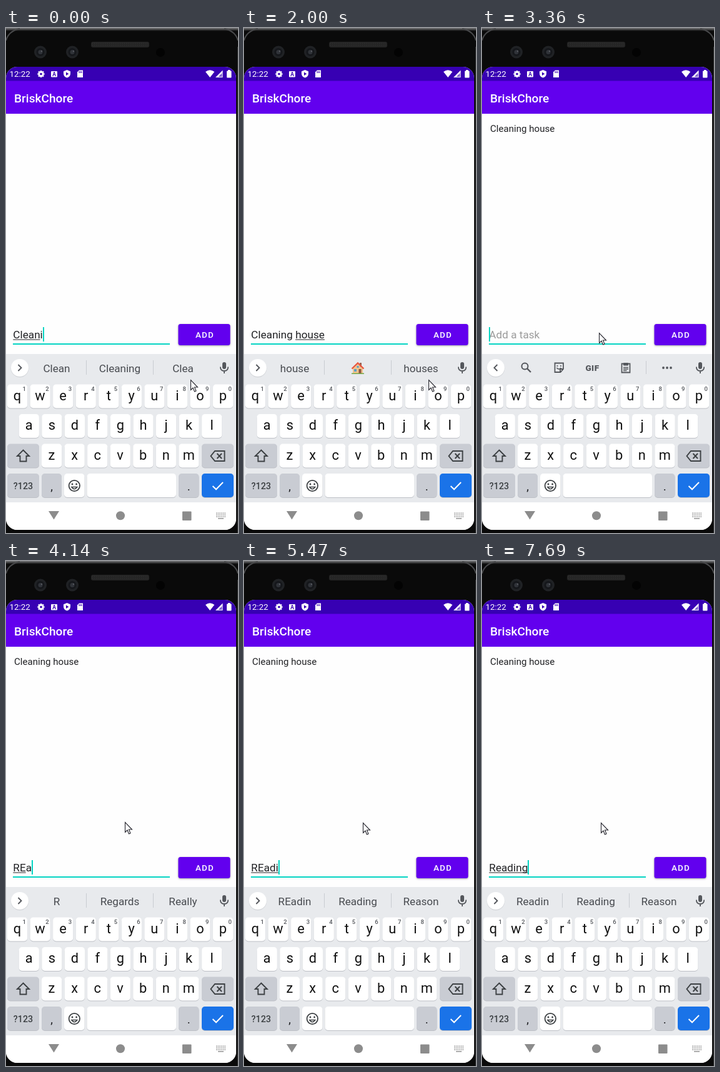
These frames come from a looping animation (371x807 px, 7990 ms). An HTML page with a canvas:

```html
<!DOCTYPE html>
<html lang="en">
<head>
<meta charset="utf-8">
<title>To-do list</title>
<style>
html, body { margin: 0; width: 100%; height: 100%; overflow: hidden; background: #0a0a0a; }
canvas { display: block; width: 371px; height: 807px; }
</style>
</head>
<body>
<canvas id="stage"></canvas>
<script>
const W = 371, H = 807, LOOP = 7990;
const canvas = document.getElementById('stage');
const ratio = window.devicePixelRatio || 1;
canvas.width = W * ratio;
canvas.height = H * ratio;
const c = canvas.getContext('2d');

const PURPLE = '#6200ee', TEAL = '#03d4c3', INK = '#202124', GREY = '#54575c';

// Each step overrides only what changes. "mark" is the underlined range.
const STEPS = [
  [0, { text: 'Cleani', mark: [0, 5], hints: 'Clean|Cleaning|Clea', caret: true, mouse: [295, 562], item: false, press: 0 }],
  [150, { text: 'Cleanin', mark: [0, 6], hints: 'Cleani|Cleaning|Cleaning’s' }],
  [310, { text: 'Cleaning', mark: [0, 7], hints: 'Cleanin|Cleaning|Cleans' }],
  [470, { text: 'Cleaning ', mark: [0, 0], hints: 'the|up|and' }],
  [630, { text: 'Cleaning h', hints: 'the|up|and' }],
  [800, { text: 'Cleaning ho', mark: [9, 10], hints: 'h|house|his' }],
  [970, { text: 'Cleaning hou', mark: [9, 11], hints: 'ho|house|home' }],
  [1140, { text: 'Cleaning hous', mark: [9, 12], hints: 'hou|house|houses' }],
  [1290, { text: 'Cleaning house', mark: [9, 13], hints: 'hous|house|houses' }],
  [1600, { mark: [9, 14], hints: 'house|*|houses' }],
  [2000, { caret: false }],
  [2280, { mouse: [298, 571] }],
  [2410, { mouse: [309, 520] }],
  [2540, { mouse: [314, 445], caret: true }],
  [2670, { mouse: [313, 470] }],
  [2800, { mouse: [311, 487] }],
  [3090, { press: 0.2, text: '', mark: [0, 0], hints: '', item: true }],
  [3240, { press: 0.1, mouse: [268, 490] }],
  [3360, { press: 0, mouse: [187, 487] }],
  [3480, { mouse: [188, 452] }],
  [3610, { mouse: [190, 417] }],
  [3740, { text: 'R' }],
  [3870, { mark: [0, 1], hints: 'R|Re|Regards' }],
  [3990, { text: 'RE', hints: 'R|Regards|Really' }],
  [4140, { text: 'REa', mark: [0, 2] }],
  [4270, { mark: [0, 3], hints: 'REa|Really|Read', mouse: [190, 418] }],
  [4400, { text: 'REad' }],
  [4530, { mark: [0, 4], hints: 'REad|Read|Ready' }],
  [4660, { text: 'REadi' }],
  [4790, { text: 'REadin', mark: [0, 5], hints: 'REadi|Reading|Reason' }],
  [4920, { text: 'REading', mark: [0, 7], hints: 'REadin|Reading|Reason' }],
  [5200, { text: 'REadin', mark: [0, 0], hints: 'REading|Reading|Readings' }],
  [5350, { mark: [0, 6], hints: 'REadin|Reading|Reason' }],
  [5470, { text: 'REadi', mark: [0, 5] }],
  [5620, { text: 'REad', mark: [0, 4], hints: 'REadi|Reading|Reason' }],
  [5770, { text: 'REa', mark: [0, 3], hints: 'REad|Read|Ready' }],
  [6080, { text: 'RE', mark: [0, 2], hints: 'REa|Really|Read' }],
  [6230, { text: 'R', mark: [0, 1], hints: 'RE|Regards|Really' }],
  [6360, { hints: 'R|Re|Regards' }],
  [6480, { text: 'Re' }],
  [6600, { text: 'Rea', mark: [0, 2], hints: 'Re|Regards|Resume' }],
  [6750, { mark: [0, 3], hints: 'Rea|Really|Read' }],
  [7000, { hints: 'Rea|Ready|Read' }],
  [7150, { text: 'Read' }],
  [7300, { mark: [0, 4], hints: 'Read|Ready|Reading' }],
  [7430, { text: 'Readi' }],
  [7560, { text: 'Readin', mark: [0, 6], hints: 'Readi|Reading|Reason' }],
  [7690, { text: 'Reading', mark: [0, 7], hints: 'Readin|Reading|Reason' }]
];

const stateAt = t => Object.assign({}, ...STEPS.filter(s => s[0] <= t).map(s => s[1]));

function rect(x, y, w, h, color, r = 0) {
  c.fillStyle = color;
  c.beginPath();
  c.roundRect(x, y, w, h, r);
  c.fill();
}

function disc(x, y, r, color) {
  c.fillStyle = color;
  c.beginPath();
  c.arc(x, y, r, 0, Math.PI * 2);
  c.fill();
}

function path(d, fill, stroke, width = 2, x = 0, y = 0) {
  const p = new Path2D(d);
  c.save();
  c.translate(x, y);
  if (fill) { c.fillStyle = fill; c.fill(p); }
  if (stroke) { c.strokeStyle = stroke; c.lineWidth = width; c.stroke(p); }
  c.restore();
}

function label(str, x, y, size, color = INK, align = 'left', weight = 400, spacing = 0) {
  c.font = `${weight} ${size}px Roboto, sans-serif`;
  c.letterSpacing = spacing + 'px';
  c.textAlign = align;
  c.fillStyle = color;
  c.fillText(str, x, y);
  c.letterSpacing = '0px';
}

function drawBezel() {
  rect(0, 0, W, H, '#0a0a0a');
  const edge = c.createLinearGradient(0, 0, 0, 5);
  edge.addColorStop(0, '#77787a');
  edge.addColorStop(1, '#0a0a0a');
  rect(0, 0, W, 5, edge);
  path('M0 20Q4 5 22 1M371 20Q367 5 349 1', null, '#48494b', 2);
  rect(370, 30, 1, 777, '#353638');
  rect(136, 22, 93, 9, '#252525', 3);
  c.fillStyle = '#343434';
  for (let x = 138; x < 228; x += 3)
    for (let y = 24; y < 30; y += 3) c.fillRect(x, y, 1, 1);
  for (const x of [55, 106]) {
    disc(x, 38.5, 10, '#202225');
    disc(x, 38.5, 6.5, '#15171b');
    disc(x, 38.5, 3.5, '#303339');
    disc(x + 2, 37, 1.2, '#555960');
  }
  disc(247, 39, 7, '#030303');
}

function drawStatusBar() {
  rect(0, 62, 368, 23, '#3700b3');
  label('12:22', 5.5, 78, 13.4, '#fff');
  c.save();
  c.translate(56, 73.5);
  for (let i = 0; i < 8; i++) {
    c.rotate(Math.PI / 4);
    rect(-1.3, -5.6, 2.6, 4, '#fff');
  }
  disc(0, 0, 4.3, '#fff');
  disc(0, 0, 1.8, '#3700b3');
  c.restore();
  rect(72, 69, 10, 9.5, '#fff', 1);
  label('A', 77, 77, 8.5, '#3700b3', 'center', 700);
  path('M97.5 67L103 69.2V73Q103 77.6 97.5 79.5Q92 77.6 92 73V69.2Z', '#fff');
  path('M96 70.5L100.3 73.2L96 76Z', '#3700b3');
  path('M117 67.5H123V79H114V70.5Z', '#fff');
  path('M117 69V72M119 69V72M121 69V72', null, '#3700b3', 1);
  path('M319 70Q326 64.5 333.3 70L326.2 79Z', '#fff');
  path('M346.5 67.5V79H335Z', '#fff');
  path('M345.5 72V78H339.5Z', '#8061d0');
  rect(353, 68.5, 7.5, 11, '#fff', 1);
  rect(355, 67, 3.5, 2, '#fff');
}

function drawHouse() {
  rect(174, 543, 16, 9.5, '#f2c48d');
  rect(185, 535, 3, 7, '#9b6250');
  path('M182 537L190 545H174Z', '#f2c48d');
  path('M172.5 544.5L182 535.5L191.5 544.5', null, '#e9573f', 2.4);
  rect(176, 545, 4, 4, '#5b9fc8');
  rect(183.5, 545, 4, 7.5, '#8d5541');
  rect(180.5, 540, 3, 3, '#5b9fc8');
  rect(172, 551.5, 20, 1.5, '#75a94b');
}

function drawTools() {
  c.lineCap = 'butt';
  c.strokeStyle = GREY;
  c.lineWidth = 2;
  c.beginPath();
  c.arc(68.5, 540.5, 5, 0, Math.PI * 2);
  c.stroke();
  path('M72 544L78 550', null, GREY, 2.4);
  path('M117 535.5H130V545L125.5 550H116.5V535.5ZM125 549.5V545H130', null, GREY, 1.8);
  disc(120.5, 540, 1.1, GREY);
  disc(126, 540, 1.1, GREY);
  path('M119.5 543Q123 547 126.5 543', null, GREY, 1.5);
  label('GIF', 176.5, 547.6, 13.5, GREY, 'center', 900, 0.5);
  path('M223.5 536.5H236.5V550.5H223.5Z', null, GREY, 1.8);
  rect(226, 535, 8, 4.5, GREY, 1);
  path('M226 542.5H234M226 545H234M226 547.5H231.5', null, GREY, 1.3);
  rect(262, 532, 1, 21, '#c9ccd1');
  for (const x of [290, 296, 302]) disc(x, 543, 1.9, GREY);
}

function drawStrip(hints) {
  disc(22, 544, 14.3, '#d3d5d9');
  disc(22, 543, 14, '#fff');
  path(hints ? 'M19.5 538L24.5 543L19.5 548' : 'M24.5 538L19.5 543L24.5 548', null, GREY, 1.9);
  if (hints) {
    hints.split('|').forEach((word, i) => {
      const x = 81 + 101 * i;
      if (word === '*') drawHouse();
      else label(word, x, 549.5, 17.1, '#484b50', 'center');
    });
    rect(128, 531, 1, 23, '#c9ccd1');
    rect(235, 531, 1, 23, '#c9ccd1');
  } else drawTools();
  rect(346, 534, 6, 11, GREY, 3);
  path('M342.8 541.5Q343 548 349 548Q355 548 355.2 541.5M349 548V552', null, GREY, 1.8);
}

function key(x, y, w, color = '#fff', h = 38) {
  rect(x, y + 1, w, h, '#bdc0c6', 5);
  rect(x, y, w, h, color, 5);
}

function keyRow(letters, firstX, y, digits) {
  [...letters].forEach((ch, i) => {
    const x = firstX + i * 36.55;
    key(x - 16, y, 32.2);
    label(ch, x, y + 25.2, 21.8, '#111', 'center');
    if (digits) label((i + 1) % 10, x + 11.3, y + 10, 9.5, GREY, 'center', 500);
  });
}

function drawKeyboard(hints) {
  rect(0, 521, 368, 237, '#e8eaed');
  drawStrip(hints);
  keyRow('qwertyuiop', 18, 569.5, true);
  keyRow('asdfghjkl', 36.7, 617);
  keyRow('zxcvbnm', 73, 664.5);
  const dim = '#c9ccd3';
  key(2, 664.5, 51, dim);
  path('M27.5 674.5L37 684H32.5V692.5H22.5V684H18Z', null, '#3c4043', 1.9);
  key(313, 664.5, 51, dim);
  path('M334 676H349.5V692H334L327.5 684ZM337.5 680L345 688M345 680L337.5 688', null, '#3c4043', 1.9);
  key(2, 712, 51, dim);
  label('?123', 27.5, 737, 14.3, '#3c4043', 'center', 500);
  key(57, 712, 32, dim);
  label(',', 73, 739, 19, INK, 'center');
  key(93, 712, 32.5);
  c.strokeStyle = '#3c4043';
  c.lineWidth = 1.8;
  c.beginPath();
  c.arc(109.3, 731.5, 8.7, 0, Math.PI * 2);
  c.stroke();
  disc(106, 729, 1.4, '#3c4043');
  disc(112.6, 729, 1.4, '#3c4043');
  path('M104.8 733.5Q109.3 740 113.8 733.5Z', null, '#3c4043', 1.5);
  key(129.5, 712, 142.5);
  key(276, 712, 32.5, dim);
  label('.', 292.3, 739, 19, INK, 'center');
  key(313, 712, 51, '#1a73e8');
  path('M330.5 732L336 737.3L347 726', null, '#fff', 2);
}

function drawNavBar() {
  rect(0, 758, 368, 44, '#fff');
  const tint = '#8c8c8c';
  path('M68 772H85L76.5 785.5Z', tint);
  disc(183, 779.3, 7, tint);
  rect(282, 772.5, 14.5, 14.5, tint, 1);
  c.fillStyle = '#9a9a9a';
  for (let row = 0; row < 3; row++)
    for (let col = 0; col < 6; col++) c.fillRect(336 + col * 2.7, 774.5 + row * 2.8, 1.6, 1.6);
  c.fillRect(339, 783, 9, 1.6);
}

function drawInput({ text, mark, caret }) {
  const x = 11.3, size = 17.2;
  rect(11, 504, 251, 2, TEAL);
  if (text) label(text, x, 496.2, size);
  else label('Add a task', x, 496.2, size, '#9b9b9b');
  const end = n => x + c.measureText(text.slice(0, n)).width;
  if (mark[1] > mark[0]) rect(end(mark[0]), 497.6, end(mark[1]) - end(mark[0]), 1, INK);
  if (caret) rect(Math.round(end(text.length)), 478, 2, 23, TEAL);
}

function drawButton(press) {
  c.save();
  c.shadowColor = 'rgba(0,0,0,.35)';
  c.shadowBlur = 3 * ratio;
  c.shadowOffsetY = ratio;
  rect(275.5, 473, 83, 34, PURPLE, 3.5);
  c.restore();
  if (press) rect(275.5, 473, 83, 34, `rgba(255,255,255,${press})`, 3.5);
  label('ADD', 303, 495.2, 13.4, '#fff', 'left', 500, 1.2);
}

function drawMouse([x, y]) {
  path('M.5 .5V16.5L4 13L6.5 19L9 18L6.5 12H11.5Z', '#fff', '#24242c', 1.1, x, y);
}

function draw(t) {
  const s = stateAt(t);
  c.setTransform(ratio, 0, 0, ratio, 0, 0);
  drawBezel();
  c.save();
  c.beginPath();
  c.roundRect(0, 62, 368, 740, 18);
  c.clip();
  rect(0, 62, 368, 740, '#fefefe');
  drawStatusBar();
  rect(0, 84.5, 368, 52.5, PURPLE);
  label('BriskChore', 13, 118.6, 19.1, '#fff', 'left', 500);
  if (s.item) label('Cleaning house', 13, 166, 15.1);
  drawInput(s);
  drawButton(s.press);
  drawKeyboard(s.hints);
  drawNavBar();
  c.restore();
  drawMouse(s.mouse);
}

const start = performance.now();
function tick() {
  draw((performance.now() - start) % LOOP);
  requestAnimationFrame(tick);
}
tick();
</script>
</body>
</html>
```
